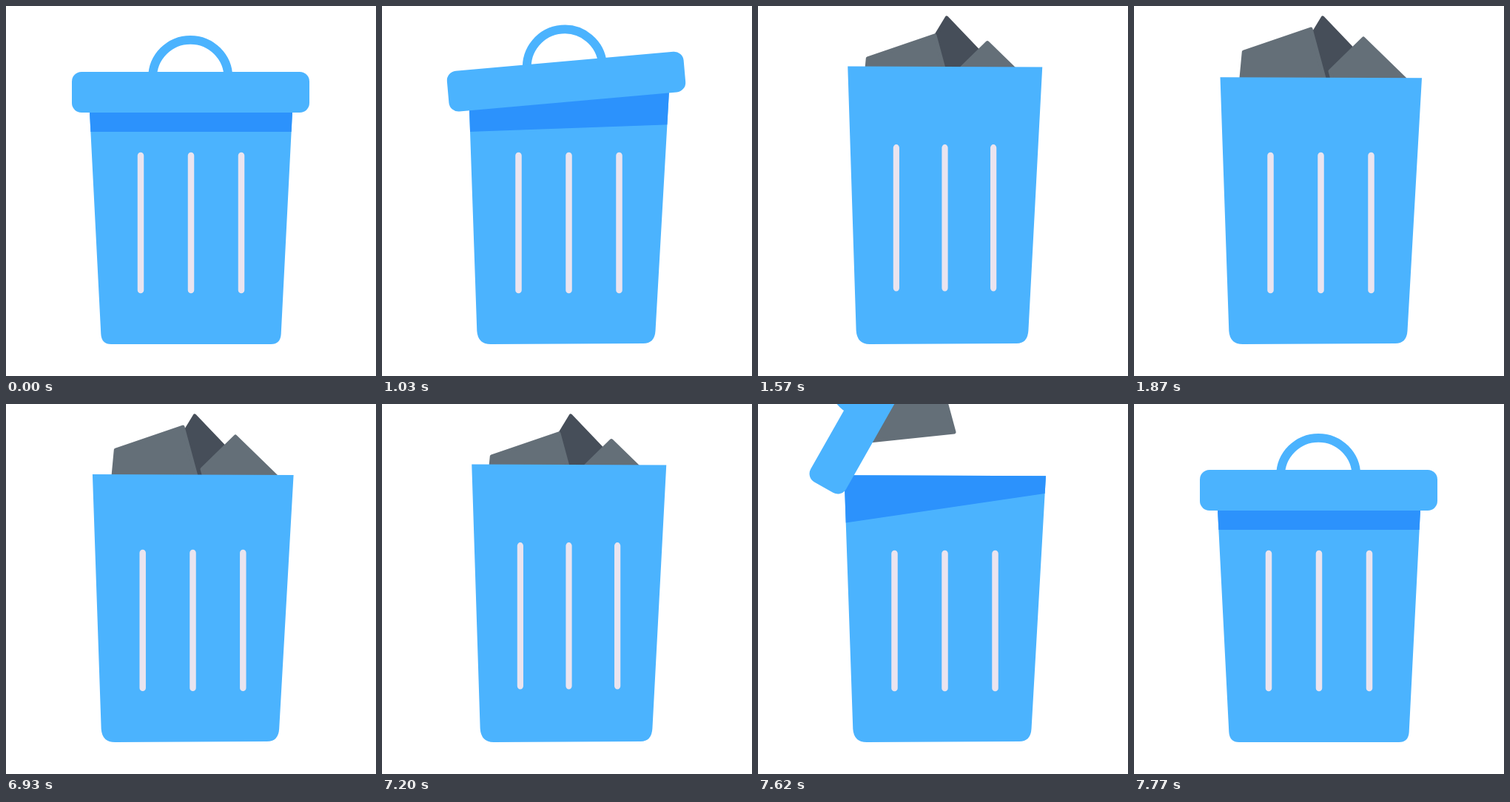
An HTML page that plays this animation: 500 px wide and 500 px high, repeating every 7800 ms.

```html
<!DOCTYPE html>
<html lang="en">
<head>
<meta charset="utf-8">
<title>Trash can</title>
<style>
  html, body { margin: 0; width: 100%; height: 100%; overflow: hidden; background: #fff; }
  svg { display: block; width: 100%; height: 100%; }
  .junk { stroke-width: 5; stroke-linejoin: round; }
  .dark { fill: #464e59; stroke: #464e59; }
  .grey { fill: #646f78; stroke: #646f78; }
</style>
</head>
<body>
<svg viewBox="0 0 500 500">
  <defs><clipPath id="clip"><path id="clipShape"/></clipPath></defs>
  <polygon id="chunk" class="dark" points="230,-25 191,39 227,84 299,84 306,80 335,22 296,-23"/>
  <polygon id="peak" class="junk dark" points="255,16 340,105 330,130 200,130 215,82"/>
  <polygon id="left" class="junk grey" points="148.3,62 239,31 265,127 141,140"/>
  <polygon id="right" class="junk grey" points="310,44 265,88 270,106 366,106 366,98.5"/>
  <g id="can">
    <path id="body" fill="#4bb3fe"/>
    <polygon id="shade" fill="#2c92fc" clip-path="url(#clip)"/>
    <path id="ribs" d="M182 202V384M250 202V384M318 202V384" stroke="#eae4ef" stroke-width="8.5" stroke-linecap="round"/>
  </g>
  <g id="lid">
    <path d="M198 100V97A51.2 51.2 0 0 1 300.4 97V100" fill="none" stroke="#4bb3fe" stroke-width="11.8"/>
    <rect x="89" y="89" width="321" height="55" rx="13" fill="#4bb3fe"/>
  </g>
</svg>
<script>
const LOOP = 7800, STEP = 30, STEPS = 29, OPEN_AT = 1000, CLOSE_AT = 6900;
const SHUT = "M112.5 130L113 143L128.3 443Q129 457 142 457H358Q371 457 371.7 443L387 143L387.5 130Z";
const OPEN = "M116.5 96.3L128.3 439Q129.5 457 147 457L353 456Q368.5 456 369.5 439L389 97.3Z";

const $ = id => document.getElementById(id);
const set = (id, name, value) => $(id).setAttribute(name, value);
const move = (id, value) => set(id, "transform", value);
const clamp = (v, lo, hi) => Math.max(lo, Math.min(hi, v));

// Smooth 0 to 1 while s goes from a to b.
function ease(s, a, b) {
  const p = clamp((s - a) / (b - a), 0, 1);
  return p * p * (3 - 2 * p);
}

// The can opens step by step, then closes by the same steps in reverse.
function stepAt(t) {
  const n = t < CLOSE_AT
    ? Math.floor((t - OPEN_AT) / STEP)
    : STEPS - Math.floor((t - CLOSE_AT) / STEP);
  return clamp(n, 0, STEPS);
}

function drawCan(s) {
  const shape = s ? OPEN : SHUT;
  set("body", "d", shape);
  set("clipShape", "d", shape);
  const shadeL = 170 - 24 * (s / 7) ** 2.8, shadeR = 170 - 69 * s / 7;
  set("shade", "points", `117,80 389,80 389,${shadeR} 117,${shadeL} 100,${shadeL} 100,80 400,80 400,${shadeR} 389,${shadeR} 389,80`);
  move("ribs", `translate(${s ? 2.5 : 0} 0)`);
  const sy = 1 - 0.008 * ease(s, 7, 11) + 0.063 * ease(s, 11, 22.5) - 0.055 * ease(s, 22.5, STEPS);
  const sx = 1 - 0.85 * (sy - 1);
  move("can", `translate(252.5 457) scale(${sx} ${sy}) translate(-252.5 -457)`);
}

function drawLid(s) {
  const turn = 98 * (1 - Math.exp(-(s ** 1.8) / 18.9));
  const fly = Math.max(0, s - 7) / 4;
  move("lid", `translate(${-92 * fly} ${-52 * fly}) rotate(${-turn} 85.6 114.8)`);
}

function drawJunk(s) {
  const d = clamp(s - 11, -11, 6);
  move("chunk", `translate(${Math.min(0, d)} ${24 * d + 0.7 * d * d}) rotate(${3.75 * d} 263 30)`);
  const rise = (depth, a, b) => depth * (1 - ease(s, a, b));
  const drop = (id, y) => move(id, `translate(0 ${y})`);
  drop("peak", rise(120, 6, 13));
  drop("left", Math.min(29 * s - 234, rise(85, 11, 21)));
  drop("right", rise(100, 13, 20));
}

const start = performance.now();
function tick() {
  const s = stepAt((performance.now() - start) % LOOP);
  drawCan(s);
  drawLid(s);
  drawJunk(s);
  requestAnimationFrame(tick);
}
tick();
</script>
</body>
</html>
```
